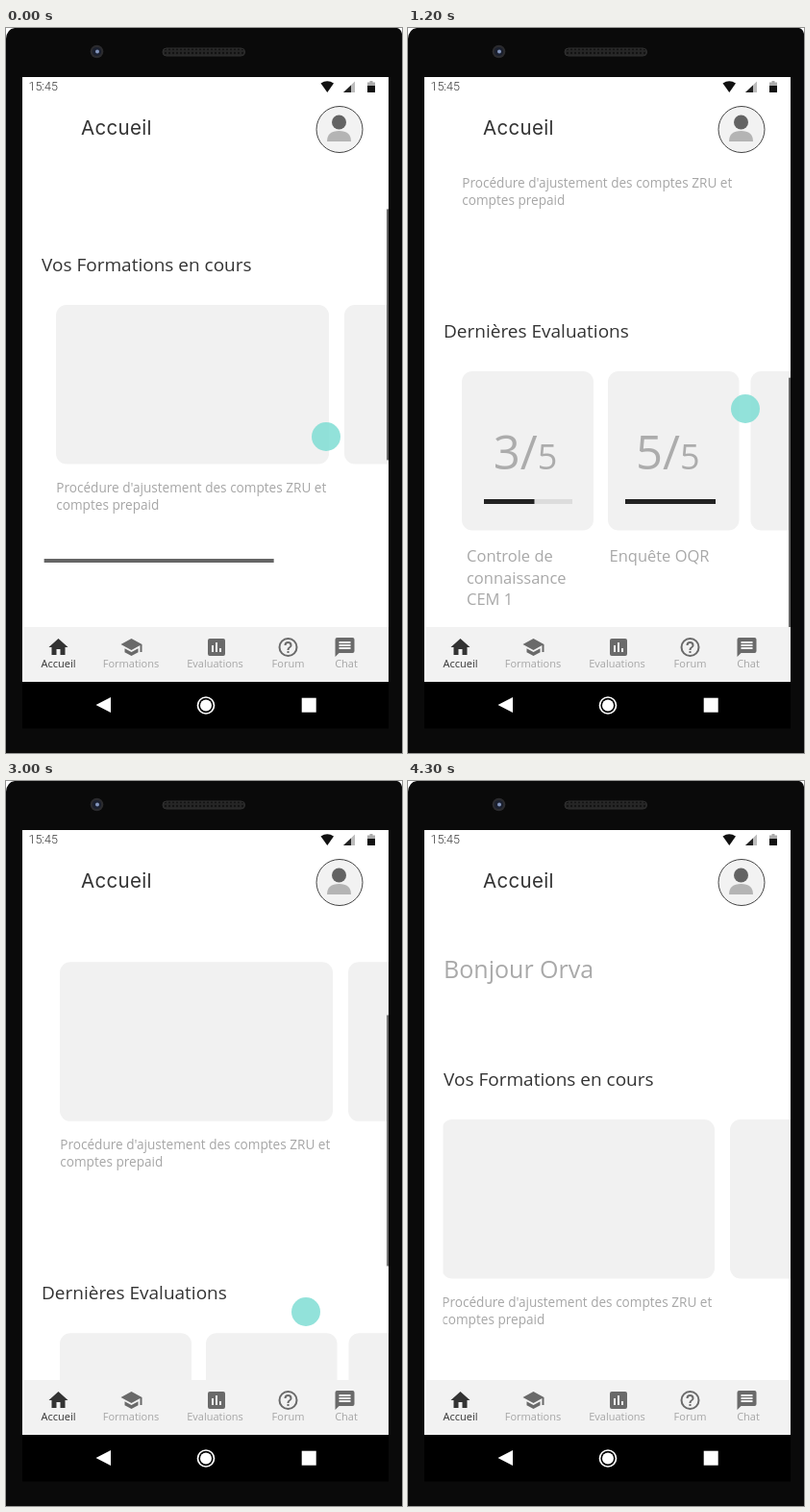
These frames come from a looping animation (412x754 px, 5000 ms). An HTML page:

```html
<!DOCTYPE html>
<html lang="fr">
<head>
<meta charset="utf-8">
<title>Accueil</title>
<style>
  html, body { margin: 0; width: 100%; height: 100%; overflow: hidden; background: #fff; }
  svg { display: block; width: 412px; height: 754px; font-family: "Open Sans", sans-serif; }
  .title { font-size: 19px; fill: #333; }
  .caption { font-size: 13.6px; fill: #a6a6a6; }
  .label { font-size: 16.5px; fill: #a8a8a8; }
  .score { font-size: 49px; fill: #acacac; }
  .score tspan { font-size: 36px; }
  .card { fill: #f1f1f1; }
  .bar { fill: #656565; }
  .tab { font-size: 11px; text-anchor: middle; fill: #a6a6a6; }
  .icon { fill: #6a6a6a; }
  .active { fill: #333; }
</style>
</head>
<body>
<svg viewBox="0 0 412 754">
  <defs>
    <clipPath id="view"><rect x="36.5" y="153" width="361.5" height="471"/></clipPath>
    <pattern id="mesh" width="4" height="4" patternUnits="userSpaceOnUse">
      <rect width="4" height="4" fill="#262626"/><circle cx="2" cy="2" r="1.2" fill="#121212"/>
    </pattern>
  </defs>

  <!-- phone -->
  <path d="M0 754V11Q1 1 9 0H407Q411 1 412 6V754Z" fill="#0a0a0a"/>
  <circle cx="94.5" cy="24.5" r="6.8" fill="#2b2b2e"/>
  <circle cx="94.5" cy="24.5" r="4.6" fill="#1a1f2e"/>
  <circle cx="95" cy="24.5" r="2" fill="#8496bd"/>
  <rect x="163" y="21" width="85.5" height="8" rx="4" fill="url(#mesh)" stroke="#303030"/>
  <rect x="17" y="51" width="381" height="630" fill="#fff"/>

  <!-- scrolling page -->
  <g clip-path="url(#view)">
    <g id="page">
      <text x="37" y="205" font-size="25" fill="#a9a9a9">Bonjour Orva</text>
      <text class="title" x="37" y="317">Vos Formations en cours</text>
      <g id="courses">
        <rect class="card" x="56" y="352" width="284" height="165.5" rx="11"/>
        <rect class="card" x="356" y="352" width="284" height="165.5" rx="11"/>
        <text class="caption" x="56.3" y="547">Procédure d'ajustement des comptes ZRU et</text>
        <text class="caption" x="56.3" y="565">comptes prepaid</text>
      </g>
      <rect id="hbar" class="bar" x="37" y="616" width="239" height="4"/>
      <text class="title" x="37" y="703">Dernières Evaluations</text>
      <g id="tests">
        <rect class="card" x="56" y="738" width="137" height="165.5" rx="11"/>
        <rect class="card" x="208" y="738" width="136.5" height="165.5" rx="11"/>
        <rect class="card" x="356.5" y="738" width="284" height="165.5" rx="11"/>
        <text class="score" x="88.8" y="840">3/<tspan>5</tspan></text>
        <text class="score" x="237" y="840">5/<tspan>5</tspan></text>
        <rect x="79" y="871" width="92" height="5" fill="#dcdcdc"/>
        <rect x="79" y="871" width="52.5" height="5" fill="#222"/>
        <rect x="226" y="871" width="94" height="5" fill="#222"/>
        <text class="label" x="61" y="936">Controle de</text>
        <text class="label" x="61" y="958.5">connaissance</text>
        <text class="label" x="61" y="981">CEM 1</text>
        <text class="label" x="209.5" y="936">Enquête OQR</text>
      </g>
    </g>
  </g>
  <rect id="vbar" class="bar" x="396" y="153" width="2" height="261"/>

  <!-- status bar and header -->
  <text x="23.5" y="65" font-size="12.5" font-weight="300" fill="#333" style="font-family:Roboto,sans-serif">15:45</text>
  <path d="M327.5 57.5Q334.3 53 341 57.5L334.3 67Z" fill="#111"/>
  <path d="M363 55.5V67H351Z" fill="#bbb"/>
  <path d="M359 59.5V67H351Z" fill="#222"/>
  <path d="M376 56.5H378.5V55H381.5V56.5H384V67H376Z" fill="#aaa"/>
  <rect x="376" y="60" width="8" height="7" fill="#111"/>
  <text x="78" y="111" font-size="20.5" letter-spacing=".3" fill="#333" style="font-family:Inter,sans-serif">Accueil</text>
  <circle cx="347" cy="105.5" r="24" fill="#f2f2f2" stroke="#444"/>
  <circle cx="346.5" cy="98" r="7.5" fill="#636363"/>
  <path d="M334 118Q334 107 346.5 107T359 118Z" fill="#b4b4b4"/>

  <!-- tabs -->
  <rect x="19" y="623" width="379" height="58" fill="#f2f2f2"/>
  <g id="tabs"></g>

  <!-- system buttons -->
  <rect x="17" y="680" width="381" height="48.5" fill="#000"/>
  <path d="M93.5 704L109 696V712Z" fill="#fff"/>
  <circle cx="208" cy="704.5" r="8.5" fill="none" stroke="#fff" stroke-width="1.7"/>
  <circle cx="208" cy="704.5" r="6" fill="#fff"/>
  <rect x="307.7" y="696.7" width="15" height="15" fill="#fff"/>

  <circle id="touch" r="15" fill="#7fddd3" fill-opacity=".85"/>
</svg>
<script>
const LOOP = 5000, STEP = 100;
const $ = id => document.getElementById(id);

// label, centre of label, left of icon, icon outline on a 24 px grid
const tabs = [
  ['Accueil', 54.5, 42.5, 'M10 20v-6h4v6h5v-8h3L12 3 2 12h3v8z'],
  ['Formations', 130, 118.5, 'M5 13.2v4L12 21l7-3.8v-4L12 17zM12 3L1 9l11 6 9-4.9V17h2V9z'],
  ['Evaluations', 217.5, 207, 'M19 3H5a2 2 0 0 0-2 2v14a2 2 0 0 0 2 2h14a2 2 0 0 0 2-2V5a2 2 0 0 0-2-2zM9 17H7v-7h2zm4 0h-2V7h2zm4 0h-2v-4h2z'],
  ['Forum', 293.5, 281.5, 'M11 18h2v-2h-2zM12 2a10 10 0 1 0 0 20a10 10 0 1 0 0-20zm0 18a8 8 0 1 1 0-16a8 8 0 1 1 0 16zm0-14a4 4 0 0 0-4 4h2a2 2 0 1 1 4 0c0 2-3 1.75-3 5h2c0-2.25 3-2.5 3-5a4 4 0 0 0-4-4z'],
  ['Chat', 354, 340.5, 'M20 2H4a2 2 0 0 0-2 2v18l4-4h14a2 2 0 0 0 2-2V4a2 2 0 0 0-2-2zM18 14H6v-2h12zm0-3H6V9h12zm0-3H6V6h12z']
];
$('tabs').innerHTML = tabs.map(([name, x, left, d], i) => {
  const state = i ? '' : ' active';
  return `<path class="icon${state}" fill-rule="evenodd" transform="translate(${left} 632)" d="${d}"/>
    <text class="tab${state}" x="${x}" y="664.5">${name}</text>`;
}).join('');

// Smooth rise from 0 to 1 between two times
function ease(t, start, end) {
  const k = Math.min(1, Math.max(0, (t - start) / (end - start)));
  return k * k * (3 - 2 * k);
}

// Two swipes up, a small rebound at the bottom, two swipes back down
const pageScroll = t => 64 + 136 * ease(t, 0, 400) + 181 * ease(t, 800, 1200)
  - 8 * ease(t, 1200, 1400) - 236 * ease(t, 2300, 3185) - 137 * ease(t, 3400, 3600);
const courseScroll = t => 4 - 4 * ease(t, 0, 200) + 21 * ease(t, 3400, 3600);
const testScroll = t => 128 * (ease(t, 1400, 1800) - ease(t, 1800, 2300));

// Scrollbars appear within one step and fade once the page rests
const shown = (t, start, end) => ease(t, start - STEP, start) - ease(t, end, end + 500);
const vbarOpacity = t => Math.max(shown(t, 0, 550), shown(t, 900, 1300),
  shown(t, 2400, 2900), shown(t, 3500, 3700));
const hbarOpacity = t => Math.max(shown(t, 0, 100), shown(t, 3500, 3700));

const swipe = (start, end, from, to) => ({ start, end, from, to });
const swipes = [
  swipe(0, 300, [333, 425], [345, 310]),
  swipe(800, 1200, [315, 527], [351, 396]),
  swipe(1400, 1800, [310, 478], [174, 482]),
  swipe(1800, 2300, [174, 482], [279, 477]),
  swipe(2400, 3000, [326, 350], [312, 552]),
  swipe(3400, 3600, [335, 347], [325, 488])
];

const move = (id, x, y) => $(id).setAttribute('transform', `translate(${x} ${y})`);
const fade = (id, opacity) => $(id).setAttribute('opacity', opacity);

function drawTouch(t) {
  const s = swipes.find(s => t >= s.start && t <= s.end);
  fade('touch', s ? 1 : 0);
  if (!s) return;
  const k = ease(t, s.start, s.end);
  move('touch', ...s.from.map((v, i) => v + (s.to[i] - v) * k));
}

function draw(now) {
  const t = Math.floor(now % LOOP / STEP) * STEP;
  const top = pageScroll(t), course = courseScroll(t);
  move('page', 0, -top);
  move('courses', -course, 0);
  move('tests', -testScroll(t), 0);
  move('vbar', 0, top * .553);
  move('hbar', course * .66, 0);
  fade('vbar', vbarOpacity(t));
  fade('hbar', hbarOpacity(t));
  drawTouch(t);
}

const start = performance.now();
function tick() {
  draw(performance.now() - start);
  requestAnimationFrame(tick);
}
tick();
</script>
</body>
</html>
```
